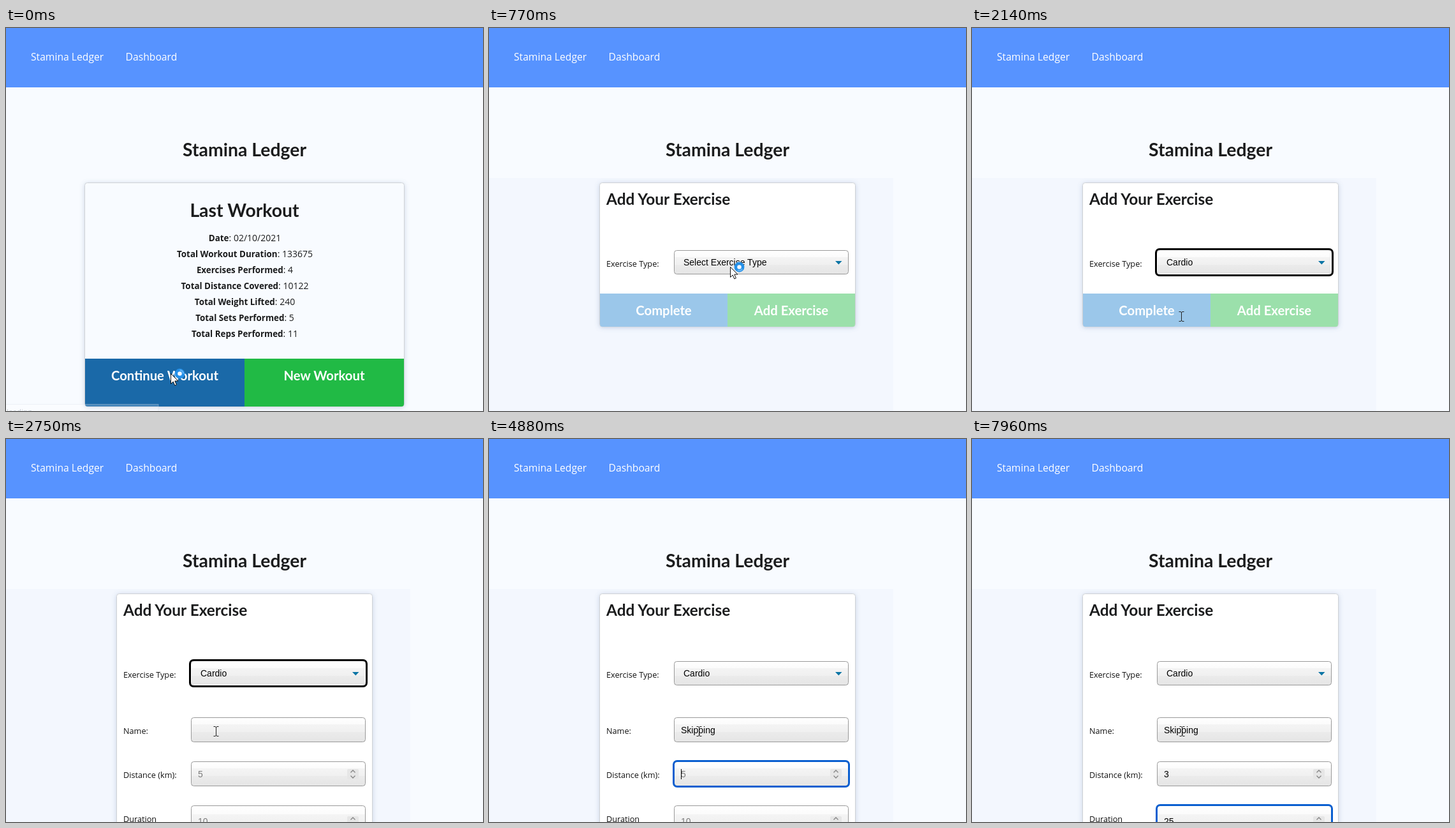
These frames come from a looping animation (748x600 px, 8000 ms). An HTML page:

```html
<!DOCTYPE html>
<html lang="en">
<head>
<meta charset="utf-8">
<title>Workout form</title>
<style>
  html, body { margin: 0; width: 100%; height: 100%; overflow: hidden; background: #f8fbff; }
  svg { display: block; width: 100%; height: 100%; white-space: pre; }
  .nav { font: 15.7px "Open Sans", sans-serif; fill: #fff; }
  .title { font: 700 28.4px Lato, sans-serif; fill: #1b1c1d; }
  .sub { font: 700 24.4px Lato, sans-serif; fill: #1b1c1d; }
  .button { font: 700 20.3px Lato, sans-serif; fill: #fff; }
  .stat { font: 14px "Open Sans", sans-serif; fill: #1b1c1d; }
  .stat .key { font-weight: 700; font-size: 13.4px; }
  .label { font: 12.7px "Open Sans", sans-serif; fill: #111; }
  .field { font: 14px "Liberation Sans", Arial, sans-serif; fill: #000; }
  .hint { font: 11.45px "Open Sans", sans-serif; fill: #000; }
  .status { font: 11.4px "Open Sans", sans-serif; fill: #c9ced6; }
  .muted { fill: #7c7c7c; }
  .mid { text-anchor: middle; }
</style>
</head>
<body>
<svg id="stage" viewBox="0 0 748 600" xmlns="http://www.w3.org/2000/svg">
  <defs>
    <linearGradient id="gloss" x1="0" y1="0" x2="0" y2="1">
      <stop offset="0" stop-color="#fff"/>
      <stop offset=".28" stop-color="#fbfbfb"/>
      <stop offset=".28" stop-color="#f4f4f4"/>
      <stop offset=".6" stop-color="#f0f0f0"/>
      <stop offset=".6" stop-color="#ebebeb"/>
      <stop offset="1" stop-color="#e5e5e5"/>
    </linearGradient>
    <filter id="glow" x="-10%" y="-10%" width="120%" height="120%">
      <feDropShadow dx="0" dy="1" stdDeviation="3.5" flood-color="#5878a8" flood-opacity=".3"/>
    </filter>
    <filter id="drop" x="-5%" y="-10%" width="110%" height="125%">
      <feDropShadow dx="2" dy="2" stdDeviation=".8" flood-color="#000" flood-opacity=".55"/>
    </filter>
  </defs>
  <rect width="748" height="600" fill="#f8fbff"/>
  <rect width="748" height="93" fill="#5793ff"/>
  <text class="nav" x="39" y="51">Stamina Ledger</text>
  <text class="nav" x="187.5" y="51">Dashboard</text>
  <g id="page"></g>
  <text class="title mid" x="374" y="201">Stamina Ledger</text>
  <g id="cursor"></g>
</svg>
<script>
const LOOP = 8000;
const page = document.getElementById('page');
const pointer = document.getElementById('cursor');
const pen = document.createElement('canvas').getContext('2d');
pen.font = '14px "Liberation Sans", Arial, sans-serif';

const text = (cls, x, y, s) => `<text class="${cls}" x="${x}" y="${y}">${s}</text>`;
const rect = (x, y, w, h, fill, extra = '') =>
  `<rect x="${x}" y="${y}" width="${w}" height="${h}" fill="${fill}" ${extra}/>`;
const within = (t, a, b) => t >= a && t < b;

function card(x, w, h, fill) {
  return rect(x + .5, 242.5, w - 1, h, fill, 'rx="4" stroke="#cfd2d6" filter="url(#glow)"');
}

// Two buttons that share the rounded bottom edge of a card
function buttons(x, y, w, h, left, right, labels, baseline) {
  const half = w / 2, mid = x + half;
  return `<path d="M${x} ${y}h${half}v${h}h${4 - half}q-4 0-4-4z" fill="${left}"/>` +
    `<path d="M${mid} ${y}h${half}v${h - 4}q0 4-4 4h${4 - half}z" fill="${right}"/>` +
    text('button mid', x + half / 2, baseline, labels[0]) +
    text('button mid', mid + half / 2, baseline, labels[1]);
}

function summary() {
  const stats = [
    ['Date', '02/10/2021'], ['Total Workout Duration', 133675], ['Exercises Performed', 4],
    ['Total Distance Covered', 10122], ['Total Weight Lifted', 240],
    ['Total Sets Performed', 5], ['Total Reps Performed', 11]
  ];
  return card(123, 502, 350.5, '#f8fbff') +
    text('title mid', 374, 296, 'Last Workout') +
    stats.map(([key, value], i) =>
      text('stat mid', 374.5, 334 + 25 * i, `<tspan class="key">${key}</tspan>: ${value}`)).join('') +
    buttons(124, 518, 500, 75, '#1a69a8', '#21ba45', ['Continue Workout', 'New Workout'], 551.5) +
    rect(-2, 589.5, 241, 20, '#fff', 'fill-opacity=".2" stroke="#d8dde4" stroke-opacity=".35"') +
    text('status', 1, 605, 'loading…');
}

// Focus rings are three pixels wide; the black one leaves a white gap inside
function box(y, h, ring) {
  let out = rect(290.5, y + .5, 273, h - 1, 'url(#gloss)', 'rx="4" stroke="#999"');
  if (ring) {
    const gap = ring === 'black' ? 1.5 : .5;
    const color = ring === 'black' ? '#000' : '#0a5fd0';
    if (ring === 'black') out += rect(290.5, y + .5, 273, h - 1, 'none', 'rx="4" stroke="#fff"');
    out += rect(290 - gap, y - gap, 274 + 2 * gap, h + 2 * gap, 'none',
      `rx="5.5" stroke="${color}" stroke-width="3"`);
  }
  return out;
}

function entry(y, h, caretTop, value, placeholder, focused, caret) {
  const x = 301 + pen.measureText(value).width;
  return box(y, h, focused && 'blue') +
    text(value ? 'field' : 'field muted', 301, caretTop + 13, value || placeholder) +
    (caret ? rect(Math.round(x), caretTop, 1, 16, '#000') : '');
}

function stepper(y) {
  return rect(535, y - 8, 18, 16, '#e6e6e6', 'rx="2"') +
    `<path d="M540.5 ${y - 2.5}l3.5-3.5 3.5 3.5M540.5 ${y + 2.5}l3.5 3.5 3.5-3.5" fill="none" stroke="#858585" stroke-width="1.3"/>`;
}

function optionList(tipY) {
  const row = tipY > 441 ? 2 : tipY > 416 ? 1 : 0;
  return rect(289.5, 386.5, 273, 85, '#fff', 'stroke="#b4b4b4" filter="url(#drop)"') +
    (row ? rect(290, 391 + 25 * row, 272, 26, '#e0dfe5') : '') +
    text('field muted', 296, 409, 'Select Exercise Type') +
    text('field', 296, 434, 'Resistance') +
    text('field', 296, 459, 'Cardio');
}

function suggestions() {
  return rect(289.5, 475.5, 273, 61, '#fff', 'stroke="#a8a8a8"') +
    ['Skipping', 'skipping', 'skipping added to existing workout']
      .map((s, i) => text('hint', 295, 491 + 20 * i, s)).join('');
}

// Letters present at a moment, given the times at which they arrive
const typed = (word, times, t) => word.slice(0, times.filter(at => t >= at).length);

function details(t) {
  const name = typed('Skipping', [3730, 3850, 4150, 4234, 4318, 4402, 4486, 4570], t);
  const distance = typed('3', [6050], t);
  const duration = typed('25', [7660, 7840], t);
  const onName = within(t, 2810, 4880);
  const onDistance = within(t, 4880, 6360);
  const onDuration = t >= 6360;
  return text('label', 184, 462, 'Name:') +
    text('label', 184, 531, 'Distance (km):') +
    text('label', 184, 600, 'Duration') +
    entry(436, 39, 448, name, '', onName, onName && !within(t, 3360, 3730)) +
    entry(505, 39, 517, distance, '5', onDistance, onDistance && !within(t, 5500, 5990)) +
    stepper(525) +
    entry(574, 49, 591, duration, '10', onDuration,
      onDuration && !within(t, 6920, 7410) && t < 7960) +
    stepper(599) +
    (within(t, 3790, 4880) ? suggestions() : '');
}

function form(t, tipY) {
  const open = t >= 2200;
  return rect(0, 235, 634, 365, '#f3f7fe') +
    card(173, 402, open ? 400 : 225.5, '#fff') +
    text('sub', 184, 277, 'Add Your Exercise') +
    text('label', 184, 374, 'Exercise Type:') +
    box(348, 38, within(t, 830, 2810) && 'black') +
    text('field', 305, 372, t < 2020 ? 'Select Exercise Type' : 'Cardio') +
    '<path d="M543 365h10.5l-5.2 5.5z" fill="#0b75a5"/>' +
    (open ? details(t) : buttons(174, 416, 400, 52, '#9bc7ea', '#9be0ab',
      ['Complete', 'Add Exercise'], 449.5)) +
    (within(t, 830, 2020) ? optionList(tipY) : '');
}

// Pointer stops: [start, end, x, y], sampled in discrete steps
const moves = [
  [310, 730, 378, 374],
  [1145, 1640, 332, 421],
  [1695, 1915, 328, 452],
  [2390, 2750, 329, 458]
];

function position(t) {
  let x = 258, y = 541;
  for (const [start, end, toX, toY] of moves) {
    const step = start < 1000 || start > 2000 ? 60 : 55;
    const now = start + step * Math.floor((t - start) / step);
    const p = Math.min(1, Math.max(0, (now - start) / (end - start)));
    const ease = p * p * (3 - 2 * p);
    x += (toX - x) * ease;
    y += (toY - y) * ease;
  }
  return [Math.round(x), Math.round(y)];
}

function arrow(t) {
  const angle = Math.floor(t / 60) * 40;
  return '<path d="M.5.5v16l3.7-3.5 2.6 6 2.6-1.1-2.6-5.9h5.2z" fill="#fff" stroke="#111"/>' +
    '<circle cx="14.5" cy=".5" r="5.6" fill="#f2f8ff" stroke="#2490e8" stroke-width="4.6"/>' +
    `<path d="M14.5-5.1a5.6 5.6 0 0 1 5.6 5.6" fill="none" stroke="#65b5f4" stroke-width="2" transform="rotate(${angle} 14.5 .5)"/>`;
}

const beam = '<path d="M-3.5-7.5h2.5l1.5 1 1.5-1h2.5M.5-7v14M-3.5 7.5h2.5l1.5-1 1.5 1h2.5" fill="none" stroke="#222"/>';

let drawn = '';
function render(t) {
  const [x, y] = position(t);
  const markup = t < 60 ? summary() : form(t, y);
  if (markup !== drawn) page.innerHTML = drawn = markup;
  pointer.setAttribute('transform', `translate(${x} ${y})`);
  pointer.innerHTML = t < 2080 ? arrow(t) : beam;
}

const begin = performance.now();
function tick() {
  render((performance.now() - begin) % LOOP);
  requestAnimationFrame(tick);
}
tick();
</script>
</body>
</html>
```
